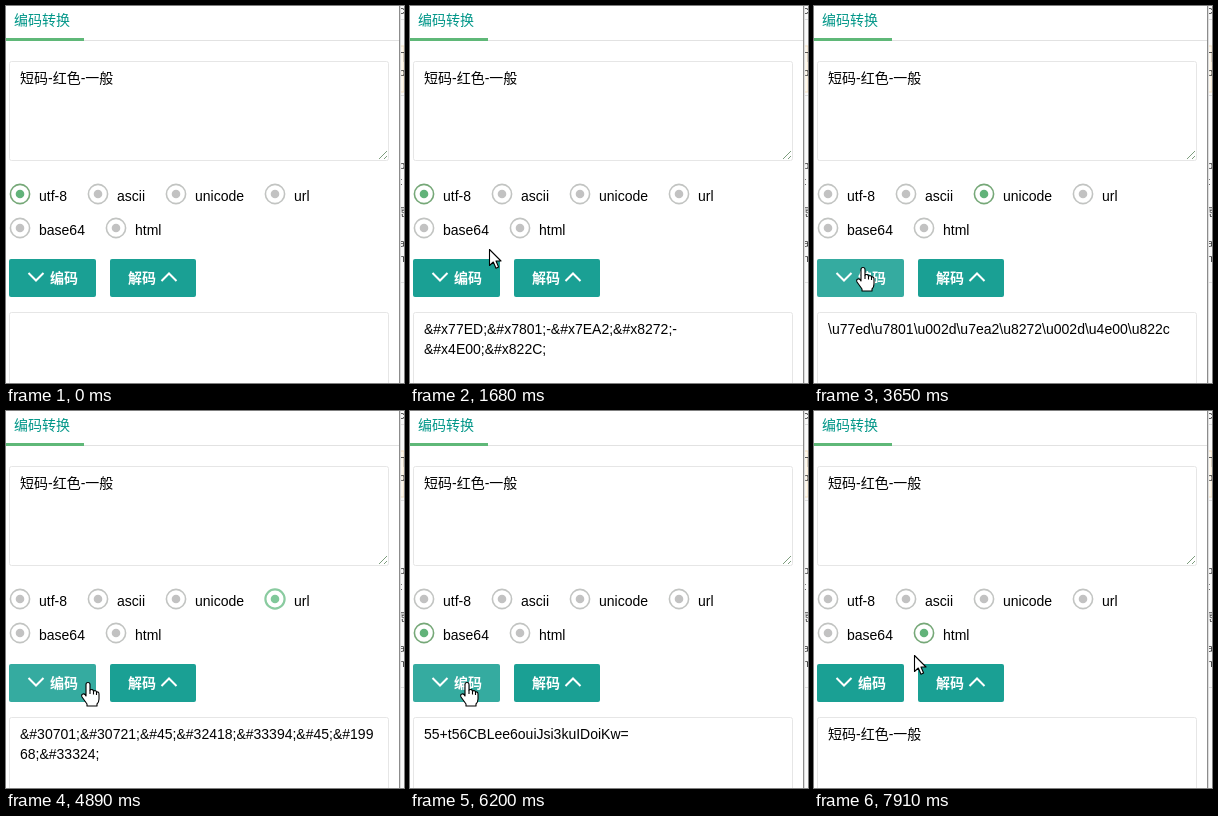
An HTML page that plays this animation: 398 by 377 pixels, repeating every 7990 ms.

```html
<!DOCTYPE html>
<html lang="zh-CN">
<head>
<meta charset="utf-8">
<style>
  html, body { margin: 0; width: 100%; height: 100%; overflow: hidden; background: #fff; }
  svg { display: block; width: 398px; height: 377px; }
  text { font: 14px "Liberation Sans", "Noto Sans CJK SC", "Noto Sans CJK", sans-serif; fill: #000; }
  .field { fill: #fff; stroke: #e6e6e6; }
  .button rect { fill: #1aa094; }
  .button.hover rect { fill: #35aba0; }
  .button text { fill: #fff; font-weight: 700; }
  .button path { fill: none; stroke: #fff; stroke-width: 2; }
  .ring { fill: none; stroke: #c2c4c2; stroke-width: 1.6; }
  .dot { fill: #c2c2c2; }
  .on .ring { stroke: #76a878; }
  .on .dot { fill: #62b37a; }
  .on.fresh .ring { stroke: #8acba0; stroke-width: 2.2; }
  .on.fresh .dot { fill: #80c89a; }
  .behind text { font-size: 11px; fill: #333; }
  .cursor path { fill: #fff; stroke: #000; stroke-width: 1.1; stroke-linejoin: round; }
</style>
</head>
<body>
<svg viewBox="0 0 398 377">
  <!-- Page showing behind the panel -->
  <g class="behind">
    <rect x="394" width="4" height="377" fill="#fafafa"/>
    <rect x="394" y="40" width="4" height="46" fill="#fdf8ee" stroke="#f3dfc0"/>
    <path d="M394 13.5h4M394 89.5h4M394 276.5h4" stroke="#ddd"/>
    <g id="fragments"></g>
    <path d="M394.5 0V377" stroke="#ddd"/>
    <path d="M393.5 0V377" stroke="#8c8c8c"/>
  </g>
  <rect width="393" height="377" fill="#fff"/>
  <path d="M0 34.5H393" stroke="#e2e2e2"/>
  <rect y="32" width="78" height="3" fill="#5fb878"/>
  <text x="8" y="19" style="fill:#009688">编码转换</text>
  <rect class="field" x="3.5" y="55.5" width="379" height="99" rx="2"/>
  <path d="M373 153l8-8M378 153l3-3" stroke="#7d9d7d" fill="none"/>
  <text x="14" y="77">短码-红色-一般</text>
  <g id="radios"></g>
  <g id="buttons"></g>
  <rect class="field" x="3.5" y="306.5" width="379" height="90" rx="2"/>
  <g id="output"></g>
  <g class="cursor" id="cursor">
    <path id="arrow" d="M.5 .5V16.5L4.3 13L7 19.2L9.6 18L7 12H12Z"/>
    <g id="hand">
      <path d="M-2 1.5Q-2-.5 0-.5T2 1.5V7Q4.5 5.5 5.5 8Q8 7 8.5 9Q11 8.5 11 11V16Q11 19 9 21V23H-1V21L-6 14Q-7 11.5-5 11T-2 13Z"/>
      <path d="M2 7V11M5.5 8V11.5M8.5 9V12" style="fill:none"/>
    </g>
  </g>
</svg>
<script>
const LOOP = 7990, ENTER = 520, STEP = 77.3;
const $ = id => document.getElementById(id);

// One round per encoding: pick its radio, then press the encode button at `press`
const rounds = [
  { label: 'utf-8', x: 14, y: 188, select: 0, encode: 1220, press: [70, 264],
    output: '&#x77ED;&#x7801;-&#x7EA2;&#x8272;-\n&#x4E00;&#x822C;' },
  { label: 'ascii', x: 92, y: 188, select: 2400, encode: 2780, press: [71, 266],
    output: '\\u77ed\\u7801\\u002d\\u7ea2\\u8272\\u002d\\u4e00\\u822c' },
  { label: 'unicode', x: 170, y: 188, select: 3250, encode: 4030, press: [49, 262],
    output: '&#30701;&#30721;&#45;&#32418;&#33394;&#45;&#199\n68;&#33324;' },
  { label: 'url', x: 269, y: 188, select: 4560, encode: 5040, press: [82, 272],
    output: '%E7%9F%AD%E7%A0%81-\n%E7%BA%A2%E8%89%B2-\n%E4%B8%80%E8%88%AC' },
  { label: 'base64', x: 14, y: 222, select: 5570, encode: 6030, press: [57, 272],
    output: '55+t56CBLee6ouiJsi3kuIDoiKw=' },
  { label: 'html', x: 110, y: 222, select: 6570, encode: 7030, press: [62, 272],
    output: '短码-红色-一般' }
];
const buttons = [
  { label: '编码', x: 3, width: 87, textX: 44, chevron: 'M22.5 267l7.5 7.5 7.5-7.5' },
  { label: '解码', x: 104, width: 86, textX: 122, chevron: 'M155.5 275l7.5-7.5 7.5 7.5' }
];

// Pointer key points [time, x, y]: entrance, a visit to radio and button per round, exit
const stay = (from, to, x, y) => [[from, x, y], [to, x, y]];
const first = rounds[0], last = rounds.at(-1);
const path = [
  [ENTER, 265, 350], [880, 95, 212],
  ...stay(first.encode, 1540, ...first.press), [1620, 79, 243],
  ...rounds.slice(1).flatMap(r => [
    ...stay(r.select - 80, r.select + 40, r.x + 2, r.y),
    ...stay(r.select + 310, r.encode + 150, ...r.press)
  ]),
  [7520, ...last.press], [7880, 100, 244]
];

$('radios').innerHTML = rounds.map(({ label, x, y }) =>
  `<g><circle class="ring" cx="${x}" cy="${y}" r="9.6"/>
   <circle class="dot" cx="${x}" cy="${y}" r="4.3"/>
   <text x="${x + 19}" y="${y + 7}">${label}</text></g>`).join('');
$('buttons').innerHTML = buttons.map(({ label, x, width, textX, chevron }) =>
  `<g class="button"><rect x="${x}" y="253" width="${width}" height="38" rx="2"/>
   <path d="${chevron}"/><text x="${textX}" y="277">${label}</text></g>`).join('');
$('fragments').innerHTML = [...'c  下b l   bt 感 am'].map((char, row) =>
  `<text x="393" y="${8 + row * 15.5}">${char}</text>`).join('');

function pointerAt(t) {
  const i = path.findIndex(p => p[0] > t);
  if (i < 0) return path.at(-1).slice(1);
  const a = path[Math.max(0, i - 1)], b = path[i];
  const k = Math.max(0, (t - a[0]) / (b[0] - a[0])), ease = k * k * (3 - 2 * k);
  return [a[1] + (b[1] - a[1]) * ease, a[2] + (b[2] - a[2]) * ease];
}

let shown = null;
function showOutput(value) {
  if (value === shown) return;
  shown = value;
  $('output').innerHTML = value.split('\n').map((line, i) =>
    `<text x="14" y="${328 + i * 20}">${line.replaceAll('&', '&amp;')}</text>`).join('');
}

function render(t) {
  const [x, y] = pointerAt(2400 + Math.floor((t - 2400) / STEP) * STEP);
  const visible = t >= ENTER;
  const overButton = buttons.map(b =>
    visible && x >= b.x && x < b.x + b.width && y >= 253 && y < 291);
  const overRadio = rounds.some(r =>
    x >= r.x - 11 && x < r.x + 58 && Math.abs(y - r.y) < 14);
  const pointing = overRadio || overButton.includes(true);

  $('cursor').style.display = visible ? '' : 'none';
  $('cursor').setAttribute('transform', `translate(${Math.round(x)} ${Math.round(y)})`);
  $('arrow').style.display = pointing ? 'none' : '';
  $('hand').style.display = pointing ? '' : 'none';

  [...$('buttons').children].forEach((el, i) => el.classList.toggle('hover', overButton[i]));
  const selected = rounds.findLast(r => r.select <= t);
  [...$('radios').children].forEach((el, i) => {
    el.classList.toggle('on', rounds[i] === selected);
    el.classList.toggle('fresh', selected !== first && t - selected.select < 350);
  });
  showOutput(rounds.findLast(r => r.encode <= t)?.output ?? '');
}

const begin = performance.now();
function frame() {
  render((performance.now() - begin) % LOOP);
  requestAnimationFrame(frame);
}
frame();
</script>
</body>
</html>
```
